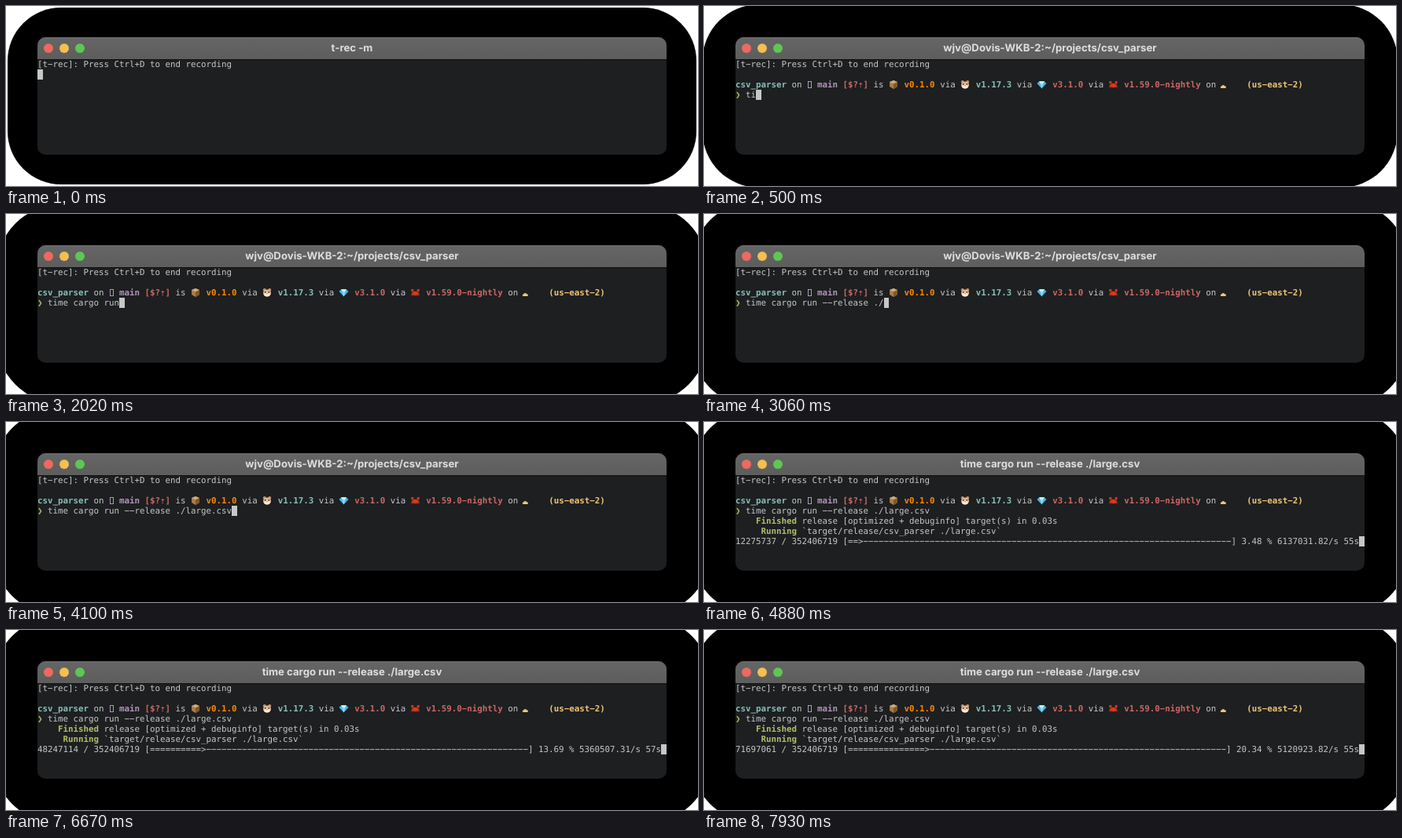
These frames come from a looping animation (880x230 px, 8000 ms). An HTML page:

```html
<!DOCTYPE html>
<html lang="en">
<head>
<meta charset="utf-8">
<title>Terminal recording</title>
<style>
  html, body { margin: 0; width: 880px; height: 230px; overflow: hidden; background: #fff; }
  body { position: relative; text-rendering: geometricPrecision; }
  #shadow { position: absolute; background: #000; }
  #window { position: absolute; left: 40px; top: 40px; width: 800px; height: 150px;
            border-radius: 10px; overflow: hidden; background: #1d1f21; }
  #bar { position: absolute; width: 800px; height: 28px; box-sizing: border-box;
         background: linear-gradient(#656565, #5d5d5d); border-top: 1px solid #757575;
         box-shadow: 0 1px #0b0c0d; }
  #bar i { position: absolute; top: 7px; width: 12px; height: 12px; border-radius: 50%; }
  #title { text-align: center; font: 700 13.2px/26px Inter, sans-serif; color: #dedede; white-space: pre; }
  #screen { position: absolute; top: 28px; left: 0; margin: 0; color: #c5c8c6;
            font: 10.8px/13px "DejaVu Sans Mono", monospace; }
  #screen div { height: 13px; white-space: pre; }
  #cursor { position: absolute; width: 6.5px; height: 13px; background: #c5c8c6; }
  #icons { position: absolute; left: 0; top: 0; }
  b { display: inline-block; height: 13px; vertical-align: top; }
  .cyan { color: #8abeb7 } .purple { color: #b294bb } .red { color: #cc6666 }
  .orange { color: #ff8700 } .yellow { color: #f0c674 } .green { color: #b5bd68 }
  .one { width: 6.5px }
</style>
</head>
<body>
<div id="shadow"></div>
<div id="window">
  <div id="bar">
    <i style="left:8px;background:#ec6a5e"></i>
    <i style="left:28px;background:#f4bf4f"></i>
    <i style="left:48px;background:#61c554"></i>
    <div id="title"></div>
  </div>
  <div id="screen"></div>
  <svg id="icons" width="800" height="150">
    <rect x="92.5" y="56.5" width="4" height="8" fill="none" stroke="#b294bb"/>
    <g transform="translate(195 54)">
      <path d="M1 3 6 1 11 3V9L6 12 1 9Z" fill="#a87b4f"/>
      <path d="M1 3 6 1 11 3 6 5.5Z" fill="#d3a877"/>
      <path d="M6 5.5 11 3V9L6 12Z" fill="#80582f"/>
    </g>
    <g transform="translate(286 54)">
      <circle cx="2.8" cy="3" r="2" fill="#d98d62"/><circle cx="9.2" cy="3" r="2" fill="#d98d62"/>
      <ellipse cx="6" cy="7" rx="5" ry="4.6" fill="#e5b583"/>
      <ellipse cx="6" cy="8.6" rx="3.8" ry="2.9" fill="#f5e9df"/>
      <circle cx="3.8" cy="6" r=".9" fill="#332"/><circle cx="8.2" cy="6" r=".9" fill="#332"/>
      <circle cx="6" cy="7.6" r=".8" fill="#d66"/>
    </g>
    <g transform="translate(383.5 54)">
      <path d="M3 2H9L12 5 6 11.5 0 5Z" fill="#4bb4e6"/>
      <path d="M3 2H9L8 5H4Z" fill="#c5f0ff"/><path d="M4 5H8L6 11.5Z" fill="#8bdcf8"/>
    </g>
    <g transform="translate(474.5 54)" fill="#d5391f">
      <ellipse cx="6" cy="7.5" rx="4" ry="2.8"/>
      <circle cx="2.3" cy="3.4" r="1.7"/><circle cx="9.7" cy="3.4" r="1.7"/>
      <path d="M2 4 3 7M10 4 9 7M3 9 1 11M9 9 11 11M2.5 8 .5 8.5M9.5 8 11.5 8.5" stroke="#d5391f"/>
    </g>
    <path d="M617.5 65a1.4 1.4 0 0 1 .6-2.6 2.2 2.2 0 0 1 4-.2 1.5 1.5 0 0 1 1 2.8Z" fill="#f0c674"/>
  </svg>
</div>
<script>
const $ = id => document.getElementById(id);
const LOOP = 8000, COLS = 122, TOTAL = 352406719, CELL = 6.5;
const starts = [0, 250, 500, 750, 1000, 1250, 1510, 1770, 2030, 2280, 2540, 2800, 3060, 3320, 3580, 3840,
  4100, 4360, 4620, 4880, 5130, 5390, 5640, 5900, 6160, 6410, 6670, 6920, 7170, 7430, 7680, 7930];
const typed = [0, 0, 2, 5, 7, 9, 12, 14, 17, 20, 22, 25, 27, 29, 32, 35, 36];
const RUN_STEP = 17;
const command = 'time cargo run --release ./large.csv';
const bold = (color, text) => `<b class="${color}">${text}</b>`;

const greeting = '[t-rec]: Press Ctrl+D to end recording';
const prompt = `${bold('cyan', 'csv_parser')} on   ${bold('purple', 'main')} ${bold('red', '[$?<b class="one">⇡</b>]')}` +
  ` is    ${bold('orange', 'v0.1.0')} via    ${bold('cyan', 'v1.17.3')} via    ${bold('red', 'v3.1.0')}` +
  ` via    ${bold('red', 'v1.59.0-nightly')} on    ${' '.repeat(2)}${bold('yellow', '(us-east-2)')}`;
const build = [
  `    ${bold('green', 'Finished')} release [optimized + debuginfo] target(s) in 0.03s`,
  `     ${bold('green', 'Running')} \`target/release/csv_parser ./large.csv\``];

// Quadratic through values at 2, 9 and 14 seconds
const curve = (s, a, b, c) =>
  a * (s - 9) * (s - 14) / 84 - b * (s - 2) * (s - 14) / 35 + c * (s - 2) * (s - 9) / 60;

function progress(s) {
  const speed = curve(s, 6137031.82, 5360507.31, 5120923.82);
  const count = Math.round(speed * s + curve(s, 1673.36, 2548.21, 4127.52));
  const part = count / TOTAL;
  const eta = Math.round((TOTAL - count) / speed);
  const head = `${count} / ${TOTAL} [`;
  const tail = `] ${(part * 100).toFixed(2)} % ${speed.toFixed(2)}/s ${eta}s`;
  const width = COLS - head.length - tail.length;
  return head + ('='.repeat(part * width) + '>').padEnd(width, '-') + tail;
}

function draw(step) {
  const running = step >= RUN_STEP, seconds = step - RUN_STEP;
  const lines = [greeting];
  let row = 1, col = 0;
  if (step > 0) {
    const chars = running ? command.length : typed[step];
    lines.push('', prompt, `${bold('green one', '❯')} ${command.slice(0, chars)}`);
    row = 3;
    col = chars + 2;
  }
  if (running) {
    lines.push(...build);
    row = 6;
    col = 0;
    if (seconds > 0) {
      lines.push(progress(seconds));
      col = COLS;
    }
  }
  // The minus glyph gives the terminal's wide hyphen
  const html = lines.map(line => `<div>${line.replaceAll('-', '−')}</div>`).join('');
  $('screen').innerHTML = `<span id="cursor" style="left:${col * CELL}px;top:${row * 13}px"></span>` + html;
  $('title').textContent = running ? command : step ? 'wjv@Dovis-WKB-2:~/projects/csv_parser' : 't-rec -m';
  $('icons').style.display = step ? '' : 'none';

  const radius = 68 + 2 * Math.min(step, 10);
  $('shadow').style.cssText = `inset:${70 - radius}px;border-radius:${radius}px`;
}

let shown = -1;
function tick() {
  const time = performance.now() % LOOP;
  const step = starts.findLastIndex(start => start <= time);
  if (step !== shown) draw(shown = step);
  requestAnimationFrame(tick);
}
tick();
</script>
</body>
</html>
```
